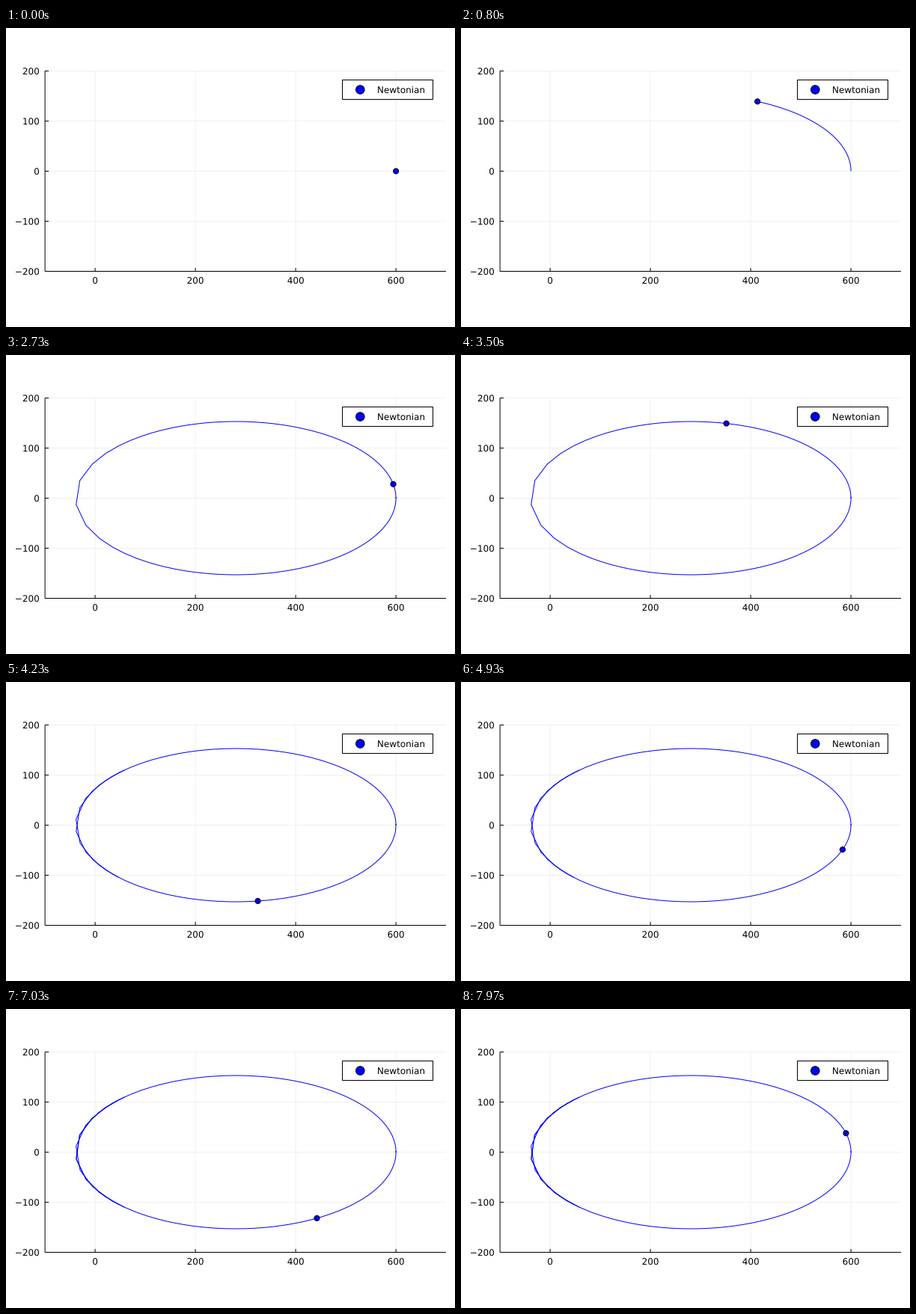
These frames come from a looping animation (600x400 px, 8000 ms). A matplotlib script:

```python
import numpy as np
import matplotlib.pyplot as plt
from matplotlib.animation import FuncAnimation
from matplotlib.patches import Circle, PathPatch, Rectangle
from matplotlib.textpath import TextPath
from matplotlib.transforms import Affine2D

plt.rcParams["font.family"] = "DejaVu Sans"
plt.rcParams["path.snap"] = False

W, H, DPI = 600, 400, 100
PT = 72 / DPI                       # points per pixel
LOOP, TICK = 8000, 20               # ms
FPS = 30                            # orbit positions shown per second

# Ellipse with the attracting body at the origin, starting at aphelion
APHELION, A = 600, 319.5
C = APHELION - A
B = np.sqrt(A**2 - C**2)
ECC = C / A
STEPS = 2                           # orbit samples per position shown
RATE = 0.08082 / STEPS              # mean anomaly per sample

LEFT, RIGHT, TOP, BOTTOM = 52.1, 588, 57.5, 325.5
SCALE = 0.67


def px(x):
    return LEFT + (x + 100) * SCALE


def py(y):
    return BOTTOM - (y + 200) * SCALE


def orbit(count):
    m = RATE * np.arange(count)
    phi = m.copy()
    for _ in range(60):             # Newton steps, damped near perihelion
        step = (phi + ECC * np.sin(phi) - m) / (1 + ECC * np.cos(phi))
        phi -= np.clip(step, -0.3, 0.3)
    return px(C + A * np.cos(phi)), py(B * np.sin(phi))


fig = plt.figure(figsize=(W / DPI, H / DPI), dpi=DPI, facecolor="white")
ax = fig.add_axes([0, 0, 1, 1])
ax.set_xlim(0, W)
ax.set_ylim(H, 0)
ax.axis("off")


def line(xs, ys, color="black", z=2):
    return ax.plot(xs, ys, color=color, lw=PT, zorder=z,
                   solid_capstyle="butt", solid_joinstyle="round")[0]


def dot(x, y, radius, z):
    return ax.add_patch(Circle((x, y), radius, fc="blue", ec="black",
                               lw=PT, zorder=z))


def label(x, y, text, align):
    """Place text by its ink: align 0 is left, 0.5 centre, 1 right."""
    path = TextPath((0, 0), text, size=12)
    box = path.get_extents()
    shift = x - box.x0 - align * box.width
    path = path.transformed(Affine2D().scale(1, -1).translate(shift, y))
    ax.add_patch(PathPatch(path, fc="black", lw=0, zorder=7))


GRID = "#f0f0f0"
for v in range(0, 601, 200):
    line([px(v)] * 2, [TOP, BOTTOM], GRID, 1)
    line([px(v)] * 2, [BOTTOM, BOTTOM - 4.5])
    label(px(v), 342, str(v), 0.5)
for v in range(-200, 201, 100):
    line([LEFT, RIGHT], [py(v)] * 2, GRID, 1)
    line([LEFT, LEFT + 5], [py(v)] * 2)
    label(44, py(v) + 4.6, str(v).replace("-", "\u2212"), 1)
line([LEFT, RIGHT], [BOTTOM] * 2)
line([LEFT] * 2, [TOP, BOTTOM])

ax.add_patch(Rectangle((449.5, 69.5), 121, 26, fc="white", ec="black",
                       lw=PT, zorder=5))
dot(473.3, 82.5, 5.75, 6)
label(497.1, 87, "Newtonian", 0)

xs, ys = orbit(LOOP * FPS // 1000 * STEPS)
first = int(np.ceil(2 * np.pi / RATE)) + 1

# Later laps differ from the first one only near perihelion
lap_xs = np.where(xs < px(60), xs, np.nan)

trail = line([], [], "blue", 3)
laps = line([], [], "blue", 3)
body = dot(xs[0], ys[0], 3.55, 4)


def draw(tick):
    k = int((tick * TICK + 15) * FPS / 1000) * STEPS
    end = min(k + 1, first)
    trail.set_data(xs[:end], ys[:end])
    laps.set_data(lap_xs[first:k + 1], ys[first:k + 1])
    body.set_center((xs[k], ys[k]))
    return trail, laps, body


anim = FuncAnimation(fig, draw, frames=LOOP // TICK, interval=TICK,
                     init_func=lambda: draw(0), repeat=True, repeat_delay=0)
plt.show()
```
